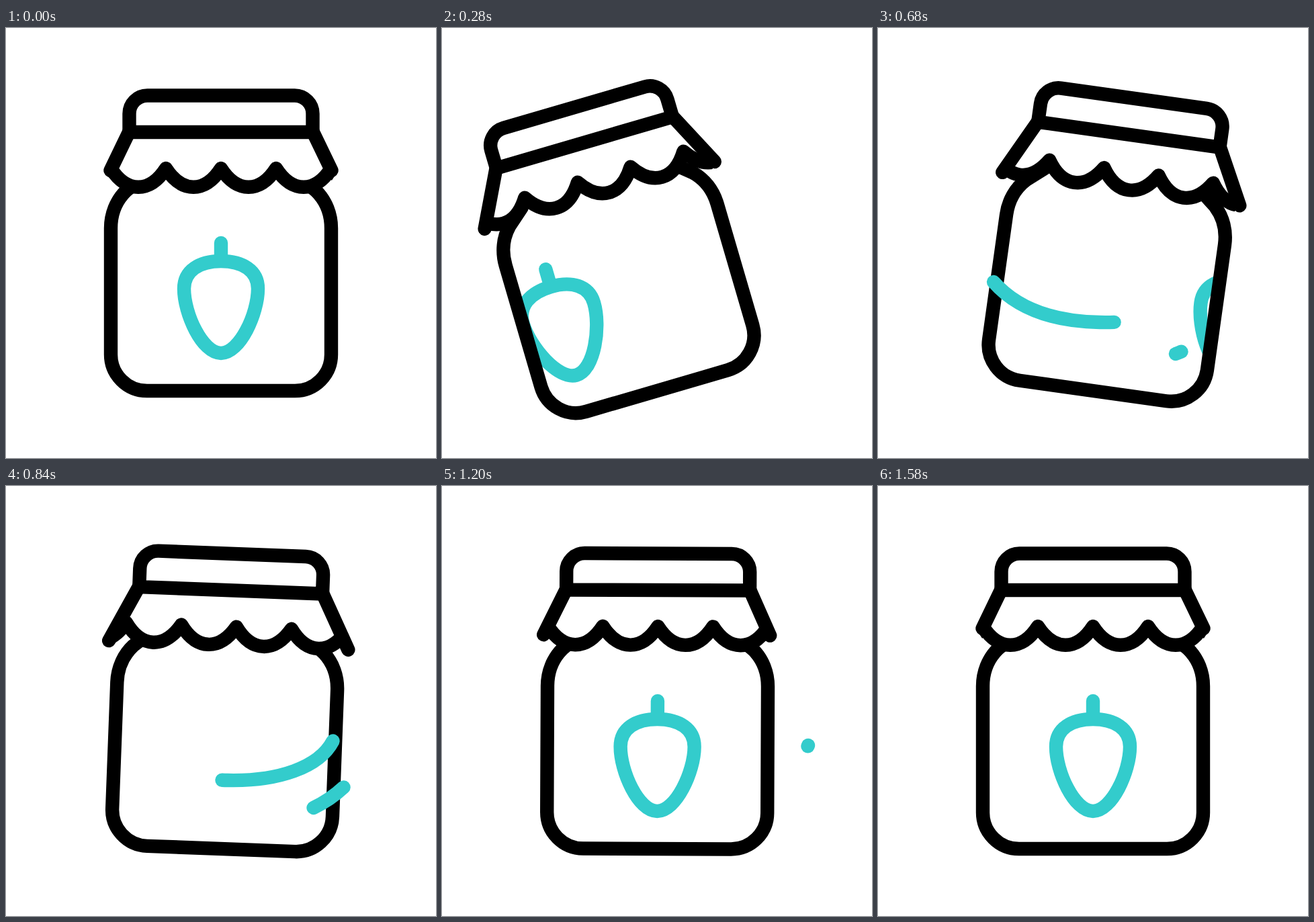
These frames come from a looping animation (640x640 px, 2.4 s). An HTML page:

```html
<!DOCTYPE html>
<html lang="en">
<head>
<meta charset="utf-8">
<title>Spinning jam jar</title>
<style>
  html, body { margin: 0; width: 100%; height: 100%; overflow: hidden; background: #fff; }
  svg { display: block; width: 100vw; height: 100vh; }
  path { fill: none; stroke: #000; stroke-width: 20.4; stroke-linecap: round; stroke-linejoin: round; }
  .teal { stroke: #33cccc; }
  .cloth { fill: #fff; }
</style>
</head>
<body>
<svg viewBox="0 0 640 640">
  <defs>
    <clipPath id="inside">
      <path d="M210 215C178 240 156 265 156 298V486A54 54 0 0 0 210 540H430A54 54 0 0 0 484 486V298C484 265 462 240 430 215Z"/>
    </clipPath>
    <clipPath id="skirt"><polygon id="edge"/></clipPath>
  </defs>
  <g id="jar">
    <g clip-path="url(#inside)">
      <g id="fruit">
        <path class="teal" d="M320 320V340"/>
        <path class="teal" d="M320 347C352 347 375 361 375 388C375 425 348 484 320 484C292 484 265 425 265 388C265 361 288 347 320 347Z"/>
      </g>
    </g>
    <path d="M203 222L178 243C164 257 156 277 156 298V486A54 54 0 0 0 210 540H430A54 54 0 0 0 484 486V298C484 277 476 257 462 243L437 222"/>
    <g clip-path="url(#skirt)"><path id="wave" class="cloth"/></g>
    <path id="sides"/>
    <path d="M183.500 155V127.500A27 27 0 0 1 210.500 100.500H429.500A27 27 0 0 1 456.500 127.500V155Z" class="cloth"/>
  </g>
  <path id="swooshA" class="teal" d="M147 340C175 397 228 436 330 438C420 440 490 410 494 353"/>
  <path id="swooshB" class="teal" d="M443 485C484 470 524 438 545 386"/>
</svg>
<script>
const LOOP = 2400, PERIOD = 82;
const $ = id => document.getElementById(id);

// [time, value] steps
const tilt = [[0, 0], [340, -17.7], [670, 8], [1015, -3.8], [1320, 2.3], [1580, 0]];
const slide = [[0, 0], [320, -113], [785, 241], [786, -240], [1160, 0]];
const drop = [[0, 0], [260, 1], [1020, 1], [1340, 0]];
const flareRight = [[0, 0], [260, 1], [820, 1], [1340, 0]];
const spin = [[0, 0], [310, -27], [520, 63.4], [680, 134], [1000, 207.5], [1200, 246]];

const linear = (t, a, b) => Math.min(1, Math.max(0, (t - a) / (b - a)));

function locate(track, t) {
  let i = 0;
  while (i < track.length - 2 && t >= track[i + 1][0]) i++;
  return [i, linear(t, track[i][0], track[i + 1][0])];
}

// Comes to rest at every step
function eased(track, t) {
  const [i, u] = locate(track, t), a = track[i][1], b = track[i + 1][1];
  return a + (b - a) * u * u * (3 - 2 * u);
}

// Keeps its speed through the steps, resting only at ends and turning points
function flowing(track, t) {
  const [i, u] = locate(track, t);
  const speed = k => {
    if (k === 0 || k === track.length - 1) return 0;
    const [p, c, n] = [track[k - 1], track[k], track[k + 1]];
    return (c[1] - p[1]) * (n[1] - c[1]) <= 0 ? 0 : (n[1] - p[1]) / (n[0] - p[0]);
  };
  const [ta, a] = track[i], [tb, b] = track[i + 1], d = tb - ta;
  const u2 = u * u, u3 = u2 * u;
  return a * (2 * u3 - 3 * u2 + 1) + b * (3 * u2 - 2 * u3)
    + d * (speed(i) * (u3 - 2 * u2 + u) + speed(i + 1) * (u3 - u2));
}

function drawCloth(t) {
  const f = eased(drop, t), y = 212 + 24.7 * f;
  const left = 155.5 - 14 * f, right = 484.5 + 13.5 * eased(flareRight, t);
  $('sides').setAttribute('d', `M183 155L${left} ${y}M457 155L${right} ${y}`);

  // Below each tip the cloth is cut along the slope of the scallop
  const out = 8.4 * (1 - f), top = y + 2.4 * (1 - f), low = top + 42;
  $('edge').setAttribute('points', [
    183, 150, 183, 155, left, y, left - out, top, left - out + 27, low,
    right + out - 27, low, right + out, top, right, y, 457, 155, 457, 150
  ].join(' '));

  const shift = ((flowing(spin, t) % PERIOD) + PERIOD) % PERIOD;
  const start = 156 - PERIOD + shift;
  const arc = `c24 37 ${PERIOD - 24} 37 ${PERIOD} 0`;
  $('wave').setAttribute('d', `M${start} 155V209${arc.repeat(6)}V155`);
}

function trim(id, from, to) {
  const path = $(id), length = path.getTotalLength();
  const shown = to > from && to > 0 && from < 1;
  path.style.display = shown ? '' : 'none';
  path.style.strokeDasharray = `${(to - from) * length} ${2 * length}`;
  path.style.strokeDashoffset = -from * length;
}

function draw(t) {
  $('jar').setAttribute('transform', `rotate(${eased(tilt, t)} 320 540)`);
  $('fruit').setAttribute('transform', `translate(${eased(slide, t)} 0)`);
  drawCloth(t);
  trim('swooshA', linear(t, 637, 1045), linear(t, 430, 870));
  trim('swooshB', linear(t, 797, 1205), linear(t, 657, 1040));
}

const begin = performance.now();
function tick() {
  draw((performance.now() - begin) % LOOP);
  requestAnimationFrame(tick);
}
tick();
</script>
</body>
</html>
```
